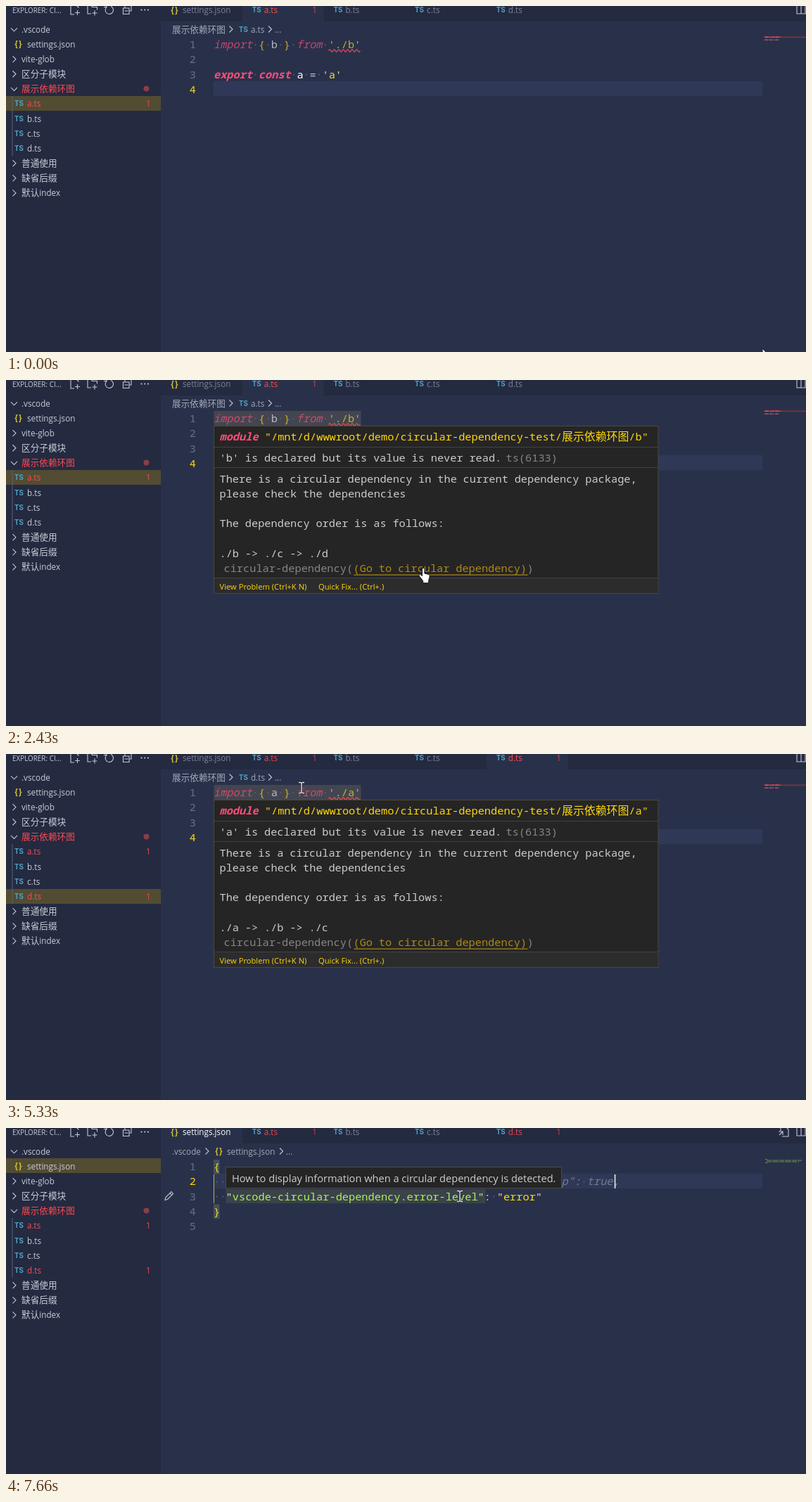
Animation of 1137x492 px, one loop 8 s. Source, as an HTML page:

```html
<!DOCTYPE html>
<html lang="zh">
<head>
<meta charset="utf-8">
<style>
html, body { margin: 0; height: 100%; overflow: hidden; background: #29314a; }
svg { display: block; width: 100vw; height: 100vh; font: 11.7px "Open Sans", "Noto Sans CJK SC", "Noto Sans CJK", sans-serif; }
text { white-space: pre; }
.mono { font: 15.3px "Noto Sans Mono", "Noto Sans CJK SC", "Noto Sans CJK", monospace; word-spacing: -.38px; }
.key { font-style: italic; }
.bold { font-weight: bold; }
.ts { font: bold 9.8px Inter, sans-serif; fill: #519fc4; }
.json { font: bold 11.5px "Noto Sans Mono", monospace; fill: #d3c332; letter-spacing: -1px; }
.line { fill: none; stroke: #c3c7d2; stroke-width: 1.1; }
</style>
</head>
<body>
<svg id="stage" viewBox="0 0 1137 492"></svg>
<script>
const RED = '#fb4b52', PINK = '#ff4d78', LIGHT = '#c9cdd7', YELLOW = '#ffd60a', STRING = '#f3dc1c', QUOTE = '#e6dd9a';
const ROW = 21.15, CHAR = 9.18, SPACE = 8.8, LEFT = 295;
const DIR = '展示依赖环图';
const LOOP = 8000;

const rect = (x, y, w, h, fill, extra = '') => `<rect x="${x}" y="${y}" width="${w}" height="${h}" fill="${fill}" ${extra}/>`;
const path = (d, attrs = 'class="line"') => `<path d="${d}" ${attrs}/>`;
const dot = (x, y, r, fill) => `<circle cx="${x}" cy="${y}" r="${r}" fill="${fill}"/>`;
const cjk = (s, size) => s.replace(/[\u4e00-\u9fff]+/g, m => `<tspan font-size="${size}">${m}</tspan>`);
const text = (x, y, s, fill = LIGHT, attrs = '') => `<text x="${x}" y="${y}" fill="${fill}" ${attrs}>${cjk(s, 12.65)}</text>`;
const mono = (x, y, s, fill, cls = '', attrs = '') => `<text x="${x}" y="${y}" fill="${fill}" class="mono ${cls}" ${attrs}>${cjk(s, 15.9)}</text>`;
const icon = (kind, x, y) => kind === 'ts' ? `<text x="${x}" y="${y - 1}" class="ts">TS</text>` : `<text x="${x - 1}" y="${y - .5}" class="json">{}</text>`;
const chevron = (x, y, open) => path(open ? `M${x - 4.5} ${y - 2}l4.5 4.5 4.5-4.5` : `M${x - 2} ${y - 4.5}l4.5 4.5-4.5 4.5`);
const baseline = row => 60.3 + ROW * row;

// A line of code: [text, fill, class] parts, with visible blanks.
function code(row, parts, opacity = 1) {
  const y = baseline(row);
  let x = LEFT, dots = '';
  for (const c of parts.map(p => p[0]).join('')) {
    if (c === ' ') dots += dot(x + 4.4, y - 5, 1, '#566080');
    x += c === ' ' ? SPACE : CHAR;
  }
  const spans = parts.map(([s, fill, cls = '']) => `<tspan fill="${fill}" class="${cls}">${s}</tspan>`).join('');
  return `${dots}<text class="mono" x="${LEFT}" y="${y}" opacity="${opacity}">${spans}</text>`;
}

function lineNumbers(count, active) {
  let out = rect(LEFT, Math.round(22.7 + ROW * active), 780, 21, '#2f3957');
  for (let i = 1; i <= count; i++)
    out += mono(270, baseline(i - 1), String(i), i === active ? YELLOW : '#687089', '', 'text-anchor="end"');
  return out;
}

function header() {
  return text(9, 9.6, 'EXPLORER: CI...', LIGHT, 'font-size="9.9"') +
    path('M97 12h-5v-14h7l4.5 4.5M101.5 6v7M98 9.5h7M121 11h-5v-12h5l1.5 2.5h7v4M126 6.5v7M122.5 10h7') +
    path('M143 1.5a5.7 5.7 0 1 0 6-1M143-3v4.5h-4M169 3v-5h9v9h-3M166.5 3h8.5v8.5h-8.5zM168.5 7h5') +
    [192.5, 197.3, 202].map(x => dot(x, 5.5, 1.1, LIGHT)).join('');
}

function tree(selected, dBroken) {
  const rows = [['.vscode', 'open'], ['settings.json', 'json'], ['vite-glob'], ['区分子模块'], [DIR, 'open', 1],
    ['a.ts', 'ts', 1], ['b.ts', 'ts'], ['c.ts', 'ts'], ['d.ts', 'ts', dBroken], ['普通使用'], ['缺省后缀'], ['默认index']];
  let out = rect(0, Math.round(22.3 + ROW * selected), 220, 21, '#524c33');
  rows.forEach(([name, kind, broken], i) => {
    const mid = 33.3 + ROW * i, y = mid + 4.4, file = kind === 'ts' || kind === 'json';
    out += file ? icon(kind, 12, y) : chevron(11.5, mid, kind === 'open');
    out += text(file ? 30 : 22, y, name, broken ? RED : LIGHT);
    if (broken && file) out += text(199, y, '1', '#e24a50');
  });
  return out + dot(199.5, 117.5, 4, '#8b3d49') + rect(8.5, 128, 1, 85, '#5b6178');
}

function tabs(active, dBroken) {
  const names = ['settings.json', 'a.ts', 'b.ts', 'c.ts', 'd.ts'];
  return rect(220, 0, 917, 22, '#242a40') + names.map((name, i) => {
    const x = 220 + 115.7 * i, on = i === active, broken = i === 1 || i === 4 && dBroken;
    return (on ? rect(x, 0, 115.7, 22, '#29314a') : '') +
      icon(i ? 'ts' : 'json', x + 14, 10.2) +
      text(x + 31, 10.2, name, broken ? (on ? RED : '#e1484f') : on ? '#fff' : '#7c8297') +
      (broken ? text(x + 99.5, 10.2, '1', on ? '#d0454d' : '#b8424c') : '');
  }).join('') + path('M1124-2v13h12v-13M1130-2v13');
}

function crumbs(folder, kind, name, more) {
  const grey = '#a3a9b9', x = kind === 'ts' ? 331 : 297, tail = kind === 'ts' ? 375 : 391;
  return text(236, 37.6, folder, grey) + chevron(x - 11.5, 33, false) + icon(kind, x, 37.6) +
    text(x + 17, 37.6, name, grey) + (more ? chevron(tail, 33, false) + text(tail + 7, 37.6, '...', grey) : '');
}

function tsFile(self, dep, broken, hover, caret) {
  const quoted = s => [["'", QUOTE], [s, STRING], ["'", QUOTE]];
  const wave = 'M458.5 63.6q1.6-3.4 3.2 0' + 't3.2 0'.repeat(13);
  return lineNumbers(4, 4) +
    (hover ? rect(295.5, 44, 209, 22, '#434650', `opacity="${hover}"`) : '') +
    code(0, [['import', PINK, 'key'], [' { ', YELLOW], [dep, '#e4e6ee'], [' } ', YELLOW],
      ['from', PINK, 'key'], [' ', LIGHT], ...quoted('./' + dep)], broken ? .72 : 1) +
    code(2, [['export const', PINK, 'key bold'], [` ${self} `, '#fff'], ['= ', LIGHT], ...quoted(self)]) +
    (broken ? path(wave, `fill="none" stroke="${RED}" stroke-width="1.2"`) + rect(1078, 43.4, 59, 1.8, '#7b3040') : '') +
    path('M1078 44.2h23', 'stroke="#e0525c" stroke-width="1.6" stroke-dasharray="6 1 2 1 4 1"') +
    path('M1078 48.2h20', 'stroke="#a8506a" stroke-width="1.4" stroke-dasharray="6 1 5 1 1 1"') +
    (caret ? rect(295.3, 107.5, 1.6, 20, '#f0d45a') : '');
}

function errorHover(dep, order, opacity) {
  const link = '(Go to circular dependency)', grey = '#858585', body = '#cbcbcb';
  return `<g opacity="${opacity}">` +
    rect(295.5, 65.5, 631.5, 238, '#252526', 'stroke="#4b4838"') +
    rect(296, 282, 630.5, 21, '#2c2c2d') + path('M296 95.5h631M296 124.5h631M296 281.5h631', 'stroke="#424242"') +
    mono(303.5, 86.2, 'module', PINK, 'key bold') +
    mono(367.8, 86.2, `"/mnt/d/wwwroot/demo/circular-dependency-test/${DIR}/${dep}"`, YELLOW) +
    mono(303.5, 116, `'${dep}' is declared but its value is never read.`, body) + mono(710.5, 116, 'ts(6133)', grey) +
    ['There is a circular dependency in the current dependency package,', 'please check the dependencies', '',
      'The dependency order is as follows:', '', order].map((s, i) => mono(303.5, 146 + ROW * i, s.replace(/>/g, '&gt;'), body)).join('') +
    mono(309.5, 273.2, 'circular-dependency(', grey) + mono(493.5, 273.2, link, '#ad8a14') + mono(740.5, 273.2, ')', grey) +
    rect(494.5, 276.5, 247, 1.2, '#ad8a14') +
    text(303.5, 297.6, 'View Problem (Ctrl+K N)', YELLOW, 'font-size="11.2"') +
    text(444, 297.6, 'Quick Fix... (Ctrl+.)', YELLOW, 'font-size="11.2"') + '</g>';
}

function settingsFile(t, caret) {
  const hover = t < 7520 ? 0 : t < 7590 ? .4 : t < 7660 ? .8 : 1;
  const brace = row => rect(295, 45 + ROW * row, 8.5, 20.5, '#47505a');
  return lineNumbers(5, 2) + brace(0) + brace(3) +
    (hover ? rect(312.6, 87, 369, 20, '#3b424a', `opacity="${hover}"`) : '') +
    rect(295, 66, 1, 41, '#b9ae62') +
    code(0, [['{', '#f0da2e']]) +
    code(1, [['  // "vscode-circular-dependency.only-show-closest-loop": true,', '#747b90', 'key']]) +
    code(2, [['  ', LIGHT], ['"', '#c9eeb0'], ['vscode-circular-dependency.error-level', '#a5f25c'], ['"', '#c9eeb0'],
      [': ', LIGHT], ['"', QUOTE], ['error', STRING], ['"', QUOTE]]) +
    code(3, [['}', '#f0da2e']]) +
    path('M1079 44.5h3M1081 46h50M1081 48h46M1079 49.5h3', 'stroke="#6f8a4c" stroke-dasharray="7 1 9 1"') +
    path('M1101 4v-6h7l4 4v10h-9M1098 5h6v5M1104 5l-5 5') +
    (t >= 7200 ? path('M226 102.5l1-4 8-8 2.5 3-8 8zM233 92.5l2.5 3') : '') +
    (caret ? rect(864.8, 66, 1.5, 20, '#f2f2f2') : '') +
    (hover ? `<g opacity="${hover}">` + rect(312.5, 55.5, 477, 30, '#252526', 'stroke="#4a4a45"') +
      text(321, 76.6, 'How to display information when a circular dependency is detected.', '#cdcdcd', 'font-size="14.6"') + '</g>' : '');
}

// Pointer moves: start, end, number of steps, then a quadratic curve.
const moves = [
  [70, 290, 4, 1075, 487, 600, -26, 526, 95],
  [440, 830, 6, 526, 95, 490, 62, 457, 53],
  [1000, 1150, 3, 457, 53, 466, 58, 476, 63],
  [1860, 2430, 9, 476, 63, 520, 180, 593.5, 267.5],
  [3300, 3620, 5, 593.5, 267.5, 640, 240, 691, 218],
  [3690, 4450, 12, 691, 218, 590, 100, 491, 49],
  [5260, 5330, 2, 491, 49, 455, 49, 420, 48],
  [5400, 6030, 10, 420, 48, 300, -20, 250, 12.5],
  [6170, 6440, 5, 250, 12.5, 252, 6, 254, 3],
  [6720, 7260, 8, 254, 3, 470, 80, 645, 97]
];

function pointerAt(t) {
  const [t0, t1, n, x0, y0, cx, cy, x1, y1] = moves.filter(m => m[0] <= t).pop() || moves[0];
  const p = t < t0 ? 0 : Math.min(1, (Math.floor((t - t0) * (n - 1) / (t1 - t0) + 1e-6) + 1) / n);
  const curve = (a, b, c) => (1 - p) ** 2 * a + 2 * p * (1 - p) * b + p * p * c;
  return [curve(x0, cx, x1), curve(y0, cy, y1)];
}

function pointer(t) {
  const [x, y] = pointerAt(t), onLink = t > 1860 && t < 2900 && y > 258;
  const arrow = t < 70 || t >= 2900 && t < 3090;
  const beam = 'M-4-7.5h2.6l1.4 1 1.4-1h2.6M0-6.5v13M-4 7.5h2.6l1.4-1 1.4 1h2.6';
  const solid = 'fill="#fff" stroke="#15171f"';
  const shape = arrow ? path('M0 0v15l3.5-3 2.6 5.5 2.4-1.1-2.6-5.3h4.6z', solid)
    : onLink || y < 44 ? path('M-2 1.5c0-2 3.4-2 3.4 0v6l5.8 1.5c1.5.5 1.6 2 1.3 3.5l-1.3 5v3.7h-8v-3l-5-6.5c-1.4-2 .5-3.5 2-2l1.8 1.5z', solid)
    : path(beam, 'fill="none" stroke="#1d2130" stroke-width="3"') + path(beam, 'fill="none" stroke="#e8e8e8" stroke-width="1.4"');
  return `<g transform="translate(${x.toFixed(2)} ${y.toFixed(2)})">${shape}</g>`;
}

// Hover card opacity: half shown for one step, then solid.
const fade = (t, start, full, end) => t < start || t >= end ? 0 : t < full ? .5 : 1;
const blink = (t, start) => Math.floor((t - start) / 500) % 2 === 0;

function draw(t) {
  const view = t < 2900 ? 1 : t < 6580 ? 4 : 0;
  const dBroken = t >= 3300;
  const selected = t < 3160 ? 5 : t < 6650 ? 8 : 1;
  const hoverA = fade(t, 1380, 1460, 2900), hoverD = fade(t, 4780, 4860, 5480);
  let out = rect(0, 0, 1137, 492, '#29314a') + rect(0, 0, 220, 492, '#242a40') +
    header() + tree(selected, dBroken) + tabs(view, dBroken);
  if (view === 1) {
    out += crumbs(DIR, 'ts', 'a.ts', true) + tsFile('a', 'b', true, hoverA, false);
    if (hoverA) out += errorHover('b', './b -> ./c -> ./d', hoverA);
  } else if (view === 4) {
    const loaded = t >= 3090;
    out += crumbs(DIR, 'ts', 'd.ts', loaded);
    if (loaded) out += tsFile('d', 'a', dBroken, hoverD, blink(t, 3080));
    if (hoverD) out += errorHover('a', './a -> ./b -> ./c', hoverD);
  } else {
    const loaded = t >= 6650;
    out += crumbs('.vscode', 'json', 'settings.json', loaded);
    if (loaded) out += settingsFile(t, blink(t, 6650));
  }
  return out + pointer(t);
}

const stage = document.getElementById('stage');
let shown = '';
function frame(now) {
  const html = draw(now % LOOP);
  if (html !== shown) stage.innerHTML = shown = html;
  requestAnimationFrame(frame);
}
frame(0);
</script>
</body>
</html>
```
